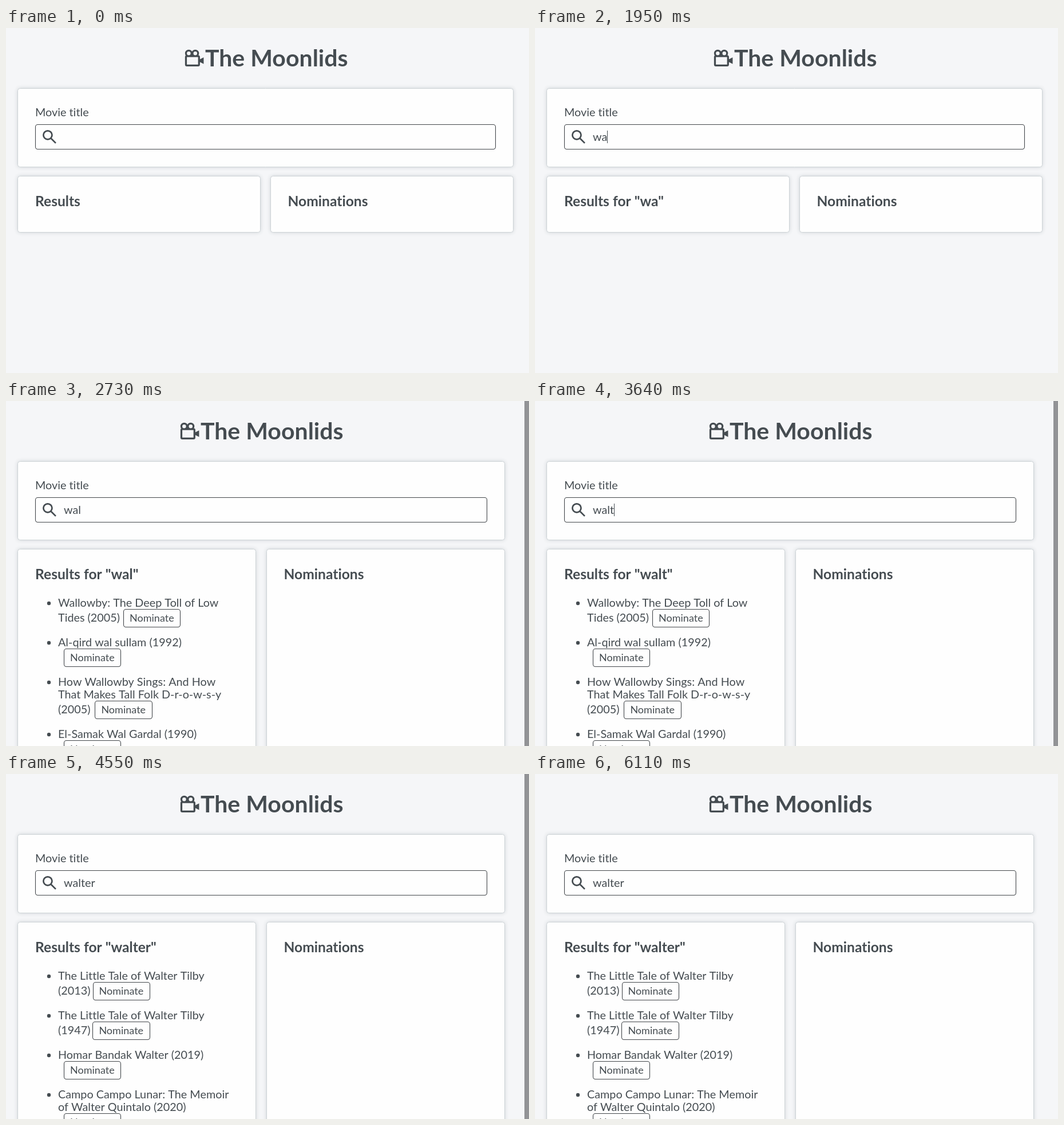
An HTML page with a canvas for the animation above (6240 ms loop, 914 by 602 pixels).

```html
<!DOCTYPE html>
<html lang="en">
<head>
<meta charset="utf-8">
<title>Movie search</title>
<style>
  html, body { margin: 0; width: 100%; height: 100%; overflow: hidden; background: #f5f6f8; }
  canvas { display: block; }
</style>
</head>
<body>
<canvas id="stage" width="914" height="602"></canvas>
<script>
const W = 914, H = 602, LOOP = 6240;
const INK = '#454c51', LINE = '#44484c', PAPER = '#fefefe', BACK = '#f5f6f8';
const ctx = document.getElementById('stage').getContext('2d');

// Each keystroke: [time, text in the field]
const TYPED = [[0, ''], [1690, 'w'], [1950, 'wa'], [2080, 'wal'],
  [3640, 'walt'], [3770, 'walte'], [4030, 'walter']];
// Spans in which the caret is lit
const CARET = [[780, 1430], [1690, 2600], [3120, 4550], [5070, 5590]];
const SCROLLBAR = [2730, 5850];

// Each entry: first baseline, lines of text [dy, text], button x and y
const FIRST = [
  { y: 359, lines: [[0, 'Wallowby: The Deep Toll of Low'], [26, 'Tides (2005)']], btn: [205, 363] },
  { y: 428, lines: [[0, 'Al-qird wal sullam (1992)']], btn: [101, 432] },
  { y: 497, lines: [[0, 'How Wallowby Sings: And How'],
    [22, 'That Makes Tall Folk D-r-o-w-s-y'], [48, '(2005)']], btn: [155.4, 523] },
  { y: 588, lines: [[0, 'El-Samak Wal Gardal (1990)']], btn: [101, 592] }
];
const SECOND = [
  { y: 359, lines: [[0, 'The Little Tale of Walter Tilby'], [26, '(2013)']], btn: [151.6, 363] },
  { y: 428, lines: [[0, 'The Little Tale of Walter Tilby'], [26, '(1947)']], btn: [151.4, 432] },
  { y: 497, lines: [[0, 'Homar Bandak Walter (2019)']], btn: [101, 501] },
  { y: 566, lines: [[0, 'Campo Campo Lunar: The Memoir'], [22, 'of Walter Quintalo (2020)']], btn: [101, 592] }
];

const within = (t, [from, to]) => t >= from && t < to;

function text(str, x, y, size, weight = 400) {
  ctx.font = `${weight} ${size}px Lato, "Open Sans", sans-serif`;
  ctx.letterSpacing = '0.01px'; // turns ligatures off
  ctx.fillStyle = INK;
  ctx.fillText(str, x, y);
}

function box(x, y, right, bottom, radius) {
  ctx.beginPath();
  ctx.roundRect(x + .5, y + .5, right - x - 1, bottom - y - 1, radius);
}

function card(x, y, right, bottom) {
  box(x, y, right, bottom, 4);
  ctx.save();
  ctx.shadowColor = 'rgba(40, 60, 70, .2)';
  ctx.shadowBlur = 7;
  ctx.fillStyle = PAPER;
  ctx.fill();
  ctx.restore();
  ctx.strokeStyle = '#cdd3d6';
  ctx.lineWidth = 1;
  ctx.stroke();
}

function outline(x, y, right, bottom, radius) {
  box(x, y, right, bottom, radius);
  ctx.strokeStyle = LINE;
  ctx.lineWidth = 1.1;
  ctx.stroke();
}

// Icons are drawn on a 24-unit grid
function icon(x, y, scale, draw) {
  ctx.save();
  ctx.translate(x, y);
  ctx.scale(scale, scale);
  ctx.strokeStyle = ctx.fillStyle = INK;
  ctx.lineWidth = 2;
  ctx.beginPath();
  draw();
  ctx.restore();
}

function ring(x, y, r) {
  ctx.moveTo(x + r, y);
  ctx.arc(x, y, r, 0, Math.PI * 2);
}

function camera() {
  ring(6, 7, 3);
  ring(13, 7, 3);
  ctx.roundRect(3, 10, 14, 10, 1);
  ctx.stroke();
  ctx.beginPath();
  ctx.moveTo(17.5, 13.6);
  ctx.lineTo(22, 11.36);
  ctx.lineTo(22, 18.36);
  ctx.lineTo(17.5, 16.1);
  ctx.fill();
}

function lens() {
  ring(9.5, 9.5, 5.5);
  ctx.moveTo(13.6, 13.6);
  ctx.lineTo(19.75, 19.75);
  ctx.stroke();
}

function entry({ y, lines, btn: [bx, by] }) {
  ctx.beginPath();
  ring(75, y - 6, 3.2);
  ctx.fillStyle = INK;
  ctx.fill();
  for (const [dy, str] of lines) text(str, 91, y + dy, 19.8);
  outline(Math.round(bx), by, Math.round(bx + 100.4), by + 32, 4);
  text('Nominate', bx + 11, by + 22, 18);
}

function render(t) {
  const query = TYPED.filter(k => k[0] <= t).pop()[1];
  const list = t >= 4550 ? SECOND : t >= 2730 ? FIRST : [];
  const long = list.length > 0;
  const right = long ? 872 : 887;
  const half = long ? 417 : 425;
  const bottom = long ? H + 40 : 357;
  const titleX = long ? 340 : 348;

  ctx.fillStyle = BACK;
  ctx.fillRect(0, 0, W, H);

  icon(titleX - 38.4, 32.8, 1.63, camera);
  text('The Moonlids', titleX, 67, 41, 700);

  card(20, 105, right, 243);
  text('Movie title', 51, 154, 19.8);
  outline(51, 168, right - 31, 212, 4);
  icon(59.9, 173.8, 1.37, lens);
  text(query, 101, 197, 19.8);
  if (CARET.some(span => within(t, span))) {
    const x = Math.round(101 + ctx.measureText(query).width);
    ctx.fillRect(x, 179, 1, 22);
  }

  card(20, 258, 20 + half, bottom);
  card(right - half, 258, right, bottom);
  text(query.length > 1 ? `Results for "${query}"` : 'Results', 51, 311, 24.6, 700);
  text('Nominations', right - half + 30.5, 311, 24.6, 700);
  list.forEach(entry);

  if (within(t, SCROLLBAR)) {
    ctx.fillStyle = '#929396';
    ctx.fillRect(906, 0, 8, H);
  }
}

const start = performance.now();
function tick() {
  render((performance.now() - start) % LOOP);
  requestAnimationFrame(tick);
}
tick();
</script>
</body>
</html>
```
